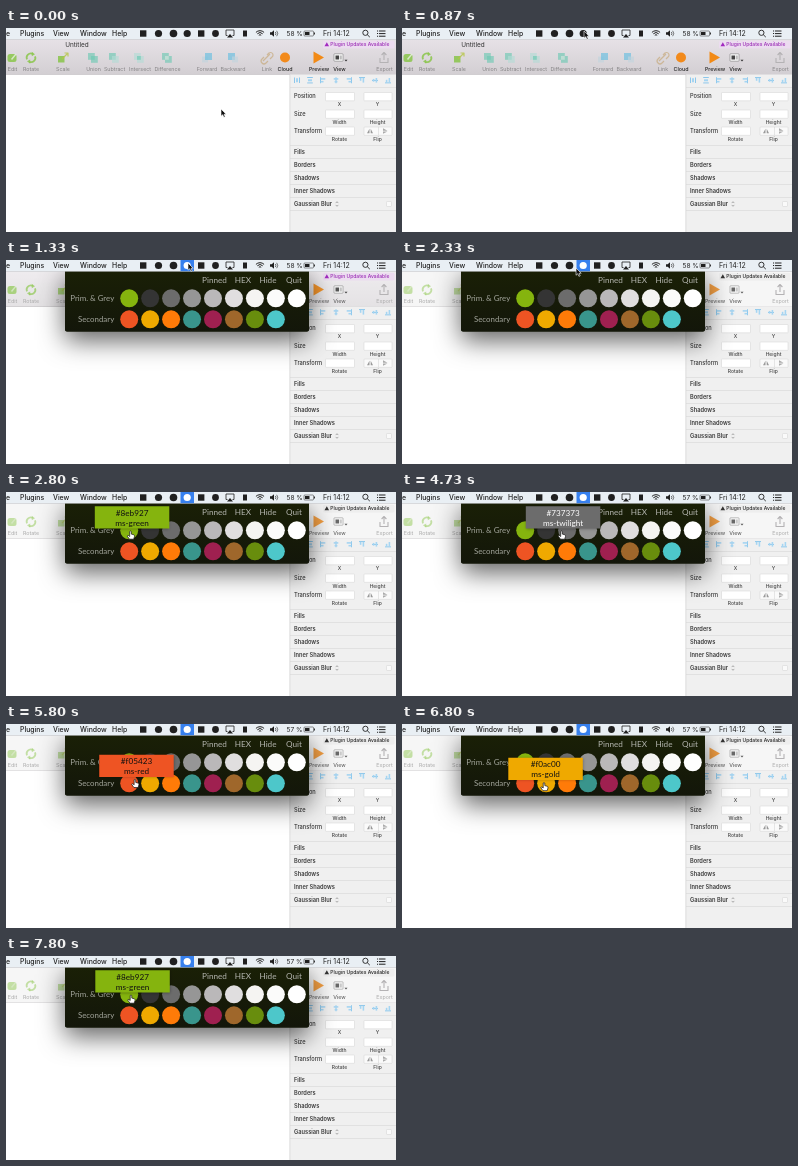
Write an HTML page with a canvas that moves like this. It is 390 px wide and 204 px high and loops after 8 s.

```html
<!DOCTYPE html>
<html lang="en">
<head>
<meta charset="utf-8">
<title>Colour palette</title>
<style>
html, body { margin: 0; width: 100%; height: 100%; overflow: hidden; background: #fff; }
canvas { display: block; width: 390px; height: 204px; }
</style>
</head>
<body>
<canvas id="stage"></canvas>
<script>
const stage = document.getElementById('stage'), c = stage.getContext('2d');
const dpr = window.devicePixelRatio || 1;
stage.width = 390 * dpr;
stage.height = 204 * dpr;

const UI = 'Inter, Roboto, sans-serif', ROUND = 'Lato, "Open Sans", sans-serif';
const LOOP = 8000, OPEN = 1270, INACTIVE = 1400, TICK = 4470;

// Cursor stops: [start, end, x, y]
const moves = [[0, 0, 215, 81], [400, 870, 182, 3], [2200, 2760, 124.5, 39.5], [3470, 3790, 143, 39.5],
  [4400, 4690, 159.5, 39.5], [5600, 5870, 123, 59], [6470, 6780, 142, 59], [7400, 7780, 125, 39.5]];

const rows = [
  ['#85b40e', '#343434', '#6c6c6c', '#969696', '#bab8b9', '#e0dedf', '#f5f4f2', '#fbfbfa', '#ffffff'],
  ['#ee5423', '#efa900', '#ff7b08', '#39958c', '#9f2050', '#9f672b', '#688d0d', '#4dc7ca']];
const swatches = rows.flatMap((row, j) => row.map((color, i) => ({ color, x: 123.2 + i * 20.95, y: 38.3 + j * 21 })));
const tips = {
  '#85b40e': ['#8eb927', 'ms-green', '#111'],
  '#343434': ['#343434', 'ms-midnight', '#fff'],
  '#6c6c6c': ['#737373', 'ms-twilight', '#fff'],
  '#ee5423': ['#f05423', 'ms-red', '#111'],
  '#efa900': ['#f0ac00', 'ms-gold', '#111']
};

function box(x, y, w, h, fill, r = 0, stroke) {
  c.beginPath();
  c.roundRect(x, y, w, h, r);
  if (fill) { c.fillStyle = fill; c.fill(); }
  if (stroke) { c.strokeStyle = stroke; c.lineWidth = .5; c.stroke(); }
}
function dot(x, y, r, fill) {
  c.beginPath();
  c.arc(x, y, r, 0, 7);
  c.fillStyle = fill;
  c.fill();
}
function text(s, x, y, size, color, align = 'left', weight = 400, font = UI) {
  c.font = `${weight} ${size}px ${font}`;
  c.textAlign = align;
  c.textBaseline = 'alphabetic';
  c.fillStyle = color;
  c.fillText(s, x, y);
}
function shape(d, x, y, fill, stroke, width = .8) {
  const p = new Path2D(d);
  c.save();
  c.translate(x, y);
  c.lineJoin = 'round';
  if (fill) { c.fillStyle = fill; c.fill(p); }
  if (stroke) { c.strokeStyle = stroke; c.lineWidth = width; c.stroke(p); }
  c.restore();
}
function gradient(y0, y1, a, b) {
  const g = c.createLinearGradient(0, y0, 0, y1);
  g.addColorStop(0, a);
  g.addColorStop(1, b);
  return g;
}

function menuBar(open, percent) {
  const ink = '#202020';
  box(0, 0, 390, 11.3, '#e9eff4');
  box(0, 11, 390, .5, '#c0c2c6');
  if (open) box(174.5, 0, 13.5, 11.2, '#3780ee');
  c.save();
  c.translate(0, -.5);
  [['e', 0], ['Plugins', 14], ['View', 47], ['Window', 74], ['Help', 106]]
    .forEach(([s, x]) => text(s, x, 8.5, 6.9, ink, 'left', 500));
  box(134, 2.8, 6.4, 6.4, ink);
  dot(152.5, 6, 3.6, ink);
  dot(167.5, 6, 3.8, ink);
  dot(181.2, 6, 3.6, open ? '#fff' : ink);
  box(192, 2.8, 6.4, 6.4, ink);
  dot(209.5, 6, 3.4, ink);
  shape('M-2.5 2H-4V-3.5H4V2H2.5', 224, 6, null, ink);
  shape('M0 .5L3 4H-3Z', 224, 6, ink);
  box(237, 3, 4, 6, ink);
  [1.7, 3.8, 5.8].forEach(r => {
    c.beginPath();
    c.arc(254, 9, r, -2.35, -.79);
    c.strokeStyle = ink;
    c.lineWidth = 1;
    c.stroke();
  });
  shape('M-4 -1.2H-2.3L0 -3.2V3.2L-2.3 1.2H-4Z', 268, 6, ink);
  shape('M1.3 -1.5Q2.5 0 1.3 1.5M2.7 -2.7Q4.8 0 2.7 2.7', 268, 6, null, ink, .6);
  text(percent + ' %', 280.5, 8.5, 6.6, ink);
  box(298, 3.5, 9.5, 5, null, .8, ink);
  box(299, 4.5, 4.5, 3, ink);
  box(308, 5, .9, 2, ink);
  text('Fri 14:12', 317, 8.5, 7, ink);
  shape('M2 0A2.6 2.6 0 1 1 -3.2 0A2.6 2.6 0 1 1 2 0M1.3 1.9L3.8 4.3', 360, 5.3, null, ink, .9);
  for (let i = 0; i < 3; i++) {
    box(371, 3 + i * 2.6, 1.1, 1, ink);
    box(373, 3 + i * 2.6, 6.5, 1, ink);
  }
  c.restore();
}

// fade runs from 0 (window in front) to 1 (window behind)
function toolbar(fade) {
  const inactive = fade == 1;
  box(0, 11.3, 390, 35.2, gradient(12, 46, '#e6e1e6', '#d3cfd3'));
  c.globalAlpha = fade;
  box(0, 11.3, 390, 35.2, '#f6f6f6');
  c.globalAlpha = 1;
  box(0, 46, 390, .6, inactive ? '#d8d8d8' : '#b9b6b9');
  text('Untitled', 59.2, 19.3, 6.4, '#333');
  box(317, 12.8, 71.5, 7.6, inactive ? '#eee' : '#ecdcf0', 1.5);
  shape('M0 -2L2.3 2H-2.3Z', 320.8, 16.2, inactive ? '#333' : '#a22ac0');
  text('Plugin Updates Available', 324.3, 18.2, 5, inactive ? '#222' : '#9a2bb5', 'left', 500);

  const green = '#84c441', teal = '#6fc9b4', pale = '#b4dcd6', blue = '#68bfe0';
  c.globalAlpha = .8 - .35 * fade;
  box(1.5, 26, 9, 8, green, 2.5);
  shape('M-1 2L3.5 -3.5', 6.5, 29.5, null, '#e8efe2', 1.4);
  shape('M-4 1.5A4.2 4.2 0 0 1 1.5 -4M4 -1.5A4.2 4.2 0 0 1 -1.5 4', 25, 29.8, null, green, 1.8);
  shape('M.8 -6L4 -3.5L.8 -1.6ZM-.8 6L-4 3.5L-.8 1.6Z', 25, 29.8, green);
  box(52, 28, 6.5, 6.5, green);
  shape('M-1 1L5 -5M1.5 -5H5V-1.5', 57, 30, null, '#b5c544', 1.2);
  c.globalAlpha = .65 - .25 * fade;
  [[87, teal, teal], [108, teal, pale], [133, pale, pale], [161, teal, teal]].forEach(([x, a, b], i) => {
    box(x - 5, 25, 6.8, 6.8, a);
    box(x - 2, 28, 6.8, 6.8, b);
    if (i > 1) box(x - 2, 28, 3.8, 3.8, i == 2 ? teal : '#e3e6e4');
  });
  box(196, 28.5, 6, 6, '#c2d4dd');
  box(199, 25, 7, 7, blue);
  box(222, 25, 7, 7, blue);
  box(226, 28.5, 6, 6, '#c2d4dd');
  shape('M-4 3L3 -4M-3 -1L-5 1A2.4 2.4 0 0 0 -1 5L1 3M0 -3L2 -5A2.4 2.4 0 0 1 5 -1L3 1', 261, 30, null, '#c4a674', 1.2);
  c.globalAlpha = 1 - .2 * fade;
  dot(279, 29.5, 5, '#f28a1c');
  shape('M-4.5 -6L6 0L-4.5 6Z', 312, 29.5, '#f28a16');
  box(328, 25.8, 9, 7.4, '#fafafa', .6, '#666');
  box(329.5, 27.5, 3.6, 4, '#444');
  box(334, 27.5, 1.8, 4, '#bbb');
  shape('M-1.5 -.8H1.5L0 1Z', 340, 32.5, '#333');
  c.globalAlpha = 1;
  shape('M-4 0V4.5H4V0M0 2V-5.5M-2.4 -3L0 -5.5L2.4 -3', 378, 30, null, '#b4b2b4', 1.1);

  [['Edit', 6.5], ['Rotate', 25], ['Scale', 57], ['Union', 87.5], ['Subtract', 108.5], ['Intersect', 134],
    ['Difference', 161.5], ['Forward', 201], ['Backward', 227], ['Link', 267 - 6], ['Cloud', 279, 1],
    ['Preview', 313, 1], ['View', 333.5, 1], ['Export', 378.5]]
    .forEach(([s, x, on]) => text(s, x, 42.9, 5.3, on ? (fade ? '#666' : '#222') : fade ? '#aaa' : '#858385', 'center', on ? 500 : 400));
}

// Two edge lines with a bar between them, or one line with two bars
function alignIcon(x, i) {
  const line = '#62b5e8', bar = '#a5d5f2';
  c.save();
  c.translate(x, 52.3);
  if (i == 1 || i > 4) c.rotate(Math.PI / 2);
  if (i < 2) {
    box(-3, -2.8, .7, 5.6, line);
    box(2.3, -2.8, .7, 5.6, line);
    box(-1, -2, 2, 4, bar);
  } else {
    const side = (i - 2) % 3 - 1;
    box(side * 2.6 - .35, -3, .7, 6, line);
    box(-2.3, -2.2, 4.6, 1.6, bar);
    box(side * .9 - 1.4, .6, 2.8, 1.6, bar);
  }
  c.restore();
}

function inspector() {
  box(284, 46.5, 106, 157.5, '#f0f0f0');
  box(283.6, 46.5, .6, 157.5, '#c8c8c8');
  for (let i = 0; i < 8; i++) alignIcon(291 + i * 13, i);
  const rules = [59, 117, 130, 143, 156, 169, 182];
  rules.forEach(y => box(284, y, 106, .5, '#d3d3d3'));

  [['Position', 'X', 'Y', 64.5], ['Size', 'Width', 'Height', 82], ['Transform', 'Rotate', 'Flip', 99]].forEach(([s, a, b, y]) => {
    text(s, 288, y + 5.8, 5.7, '#333', 'left', 500);
    box(319.5, y, 29, 8.3, '#fff', .5, '#d0d0d0');
    box(358, y, 28, 8.3, s == 'Transform' ? '#fafafa' : '#fff', .5, '#d0d0d0');
    text(a, 333.5, y + 13.7, 5, '#444', 'center', 500);
    text(b, 371.5, y + 13.7, 5, '#444', 'center', 500);
  });
  box(372, 99, .5, 8.3, '#d0d0d0');
  shape('M-3 2.3L-.5 -2.3V2.3ZM.7 -2.3V2.3H3Z', 364, 103, '#999');
  shape('M-2 -2.8L2.5 -.3H-2ZM-2 2.8L2.5 .5H-2Z', 379, 103, '#aaa');
  ['Fills', 'Borders', 'Shadows', 'Inner Shadows', 'Gaussian Blur']
    .forEach((s, i) => text(s, 288, 125.7 + i * 13, 5.7, '#3a3a3a', 'left', 600));
  shape('M-1.3 -.9L0 -2.3L1.3 -.9M-1.3 .9L0 2.3L1.3 .9', 331, 176, null, '#777', .6);
  box(380.5, 173.5, 5, 5, '#fafafa', .7, '#d0d0d0');
}

function panel() {
  c.save();
  c.shadowColor = 'rgba(0,0,0,.62)';
  c.shadowBlur = 26 * dpr;
  c.shadowOffsetY = 9 * dpr;
  box(59, 9, 244, 62.4, '#171b08', 2);
  c.restore();
  box(59, 9, 244, 62.4, gradient(10, 72, '#1a2006', '#13160a'), 2);
  [['Pinned', 208.5], ['HEX', 237], ['Hide', 262], ['Quit', 288]]
    .forEach(([s, x]) => text(s, x, 23.4, 8.2, '#b5b6b0', 'center', 400, ROUND));
  ['Prim. & Grey', 'Secondary'].forEach((s, i) => text(s, 108.2, 41.2 + i * 21, 7.9, '#a3a59c', 'right', 400, ROUND));
  swatches.forEach(s => dot(s.x, s.y, 9, s.color));
}

function tooltip({ color }, x, y) {
  const [hex, name, ink] = tips[color];
  c.save();
  c.shadowColor = 'rgba(0,0,0,.35)';
  c.shadowBlur = 3 * dpr;
  box(x - 35.7, y - 25.2, 74.5, 22.3, color);
  c.restore();
  text(hex, x + 1.6, y - 16, 8.2, ink, 'center', 400, ROUND);
  text(name, x + 1.6, y - 5.8, 8.2, ink, 'center', 400, ROUND);
}

function cursorAt(t) {
  let [, , x, y] = moves[0];
  for (const [start, end, nx, ny] of moves.slice(1)) {
    if (t < start) break;
    const k = Math.min(1, (t - start) / (end - start)), e = k * k * (3 - 2 * k);
    x += (nx - x) * e;
    y += (ny - y) * e;
  }
  return [x, y];
}

function draw(t) {
  const open = t >= OPEN, [x, y] = cursorAt(t);
  c.setTransform(dpr, 0, 0, dpr, 0, 0);
  box(0, 0, 390, 204, '#fff');
  toolbar(Math.max(0, Math.min(1, (t - OPEN) / (INACTIVE - OPEN))));
  inspector();
  if (open) panel();
  menuBar(open, t < TICK ? 58 : 57);
  const over = open && swatches.find(s => tips[s.color] && Math.hypot(s.x - x, s.y - y) < 9);
  if (over) {
    tooltip(over, x, y);
    shape('M-.8 4V0Q0 -1 .8 0V2.6L3.4 3.3Q4.2 3.7 4 5L3.2 7.7H-1L-3.2 4.7Q-3 3.5 -2 4L-.8 5Z', x, y, '#fff', '#111', .7);
  } else {
    shape('M0 0V7.2L1.7 5.7L2.9 8.3L4.2 7.7L3 5.2H5.2Z', x, y, '#111', '#fff', .6);
  }
}

const begin = performance.now();
function frame() {
  draw((performance.now() - begin) % LOOP);
  requestAnimationFrame(frame);
}
frame();
</script>
</body>
</html>
```
